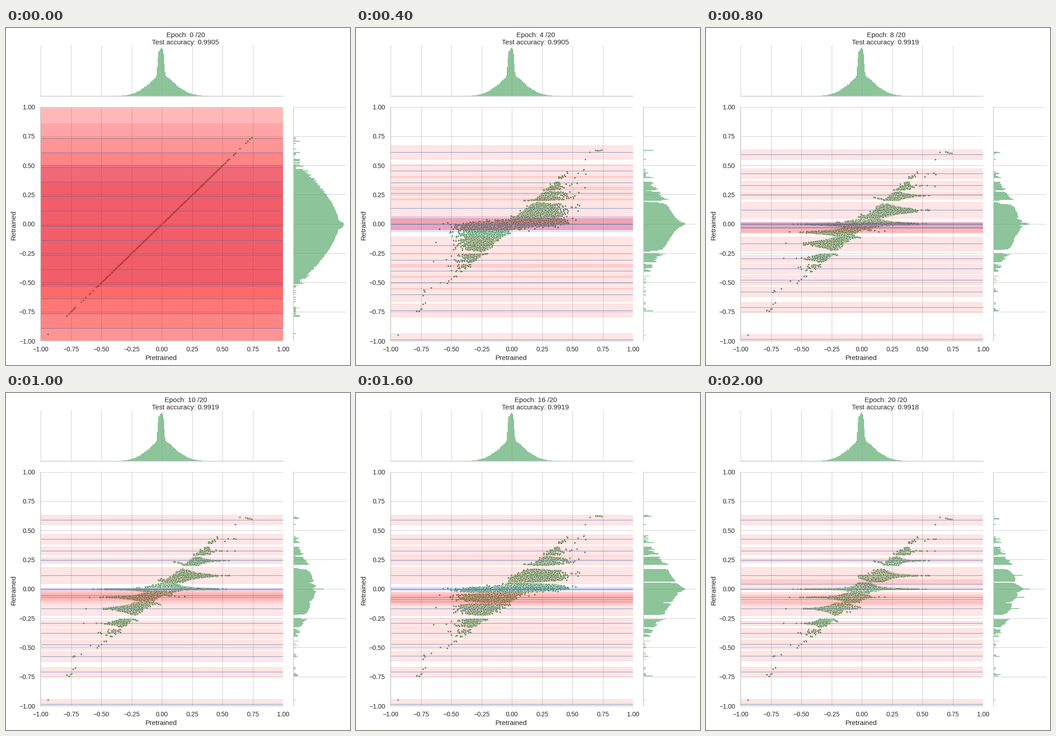
Write a matplotlib script that moves like this. It is 755x741 px and loops after 2100 ms.

```python
import numpy as np
import matplotlib.pyplot as plt
from matplotlib.animation import FuncAnimation

W, H, DPI = 755, 741, 100
EPOCHS = 20
PX = 72 / DPI
GREEN, DOT, BLUE, GREY, INK = "#55a868", "#479658", "#4c72b0", "#cccccc", "#262626"

plt.rcParams.update({
    "font.family": "Liberation Sans", "text.color": INK,
    "xtick.labelcolor": INK, "ytick.labelcolor": INK,
    "axes.edgecolor": GREY, "axes.linewidth": 1.6 * PX, "axes.axisbelow": True,
    "grid.color": GREY, "grid.linewidth": PX,
})

# Cluster centres the weights settle on, above and below zero.
UPPER = np.array([.59, .425, .325, .243, .115])
LOWER = np.array([-.167, -.293, -.377, -.473, -.573, -.708, -.985])
ROWS = np.concatenate([UPPER, [0, -.07], LOWER])
START = .735 - .125 * np.arange(15)     # even spacing before training
CORE = slice(5, 8)                      # three clusters that meet at zero


def tight(epoch):
    """How firmly weights cling to their cluster; relaxes once at epoch 16."""
    return np.interp(epoch, [4, 13, 16, 20], [0, 1, .1, 1])


def zero_pin(epoch):
    return np.interp(epoch, [6, 10, 13, 16], [0, 1, 1, 0])


def late_pin(epoch):
    return np.interp(epoch, [16, 20], [0, 1])


def log_density(v):
    wide = np.maximum(101 - 260 * np.abs(v) ** 1.6, -5)
    return (wide + 9.5 * np.exp(-((v + .009) / .031) ** 6)) / 12.5


# Initial weights.
rng = np.random.default_rng(4)
grid = np.linspace(-.79, .738, 4000)
cdf = np.cumsum(np.exp(log_density(grid)))
x = np.interp(rng.random(110_000), cdf / cdf[-1], grid)
x = np.append(x, [-.94, -.788, .738, .725])

# Each weight shrinks a random way towards zero, less so in the tails.
reach = np.clip((.76 - np.abs(x) - .08 * (x > 0)) / .16, 0, 1)
scale = 1 - reach * (1 - rng.random(x.size) ** 1.6)
z = x * scale + rng.laplace(0, .007, x.size)
drift = rng.normal(0, .04, x.size) * np.exp(-(x / .25) ** 2) * scale

row = ROWS[np.argmin(np.abs((z + drift)[:, None] - ROWS), axis=1)]
inner = np.abs(row) < .2
limit = np.where(inner, .1, .04)
outlying = np.maximum(np.abs(x - row) - .06, 0)
near_zero = (row == 0) & (np.abs(z) < .02)
late = inner & (rng.random(x.size) < .5)
shown = (np.abs(x) > .2) | (np.arange(x.size) % 4 == 0)


def weights(epoch):
    drifted = z + drift * np.interp(epoch, [6, 16], [0, 1])
    offset = limit * np.tanh((drifted - row) / limit)
    pull = np.where(inner, 12, 25) * tight(epoch)
    pin = np.minimum(near_zero * zero_pin(epoch) + late * late_pin(epoch), 1)
    y = row + offset * np.exp(-pull * outlying) * (1 - pin)
    return x + (y - x) * (1 - np.exp(-1.2 * epoch))


def bar_lengths(y, epoch):
    n = np.histogram(y, edges)[0]
    logs = np.log(np.maximum(n, 1))
    peak = 92 + 18 * np.exp(-epoch) - 26 * zero_pin(epoch) - 12 * late_pin(epoch)
    return np.where(n > 0, 5 + (peak - 5) * logs / logs.max(), 0)


def band_layout(epoch):
    """Centres and half-heights of the cluster bands."""
    low = np.interp(epoch, [6, 11], [0, -.07])
    high = np.interp(epoch, [6, 11, 16, 20], [0, -.07, -.07, .04])
    goal = np.concatenate([UPPER, [high, low, 1.3 * low], LOWER])
    move, shrink = np.full(15, .45), np.full(15, .85)
    move[CORE], shrink[CORE] = 2, 1.1
    centres = goal + (START - goal) * np.exp(-move * epoch)

    size = np.abs(goal)
    narrow = .027 * tight(epoch) * np.exp(-((size - .27) / .06) ** 2)
    broad = .035 * np.exp(-((size - .135) / .04) ** 2)
    broad[CORE] = 0
    rest = .042 - narrow + broad * (1 - np.exp(-epoch / 2))
    return centres, rest + (.5 - rest) * np.exp(-shrink * epoch)


fig = plt.figure(figsize=(W / DPI, H / DPI), dpi=DPI, facecolor="white")


def panel(left, top, right, bottom, spines):
    ax = fig.add_axes([left / W, 1 - bottom / H, (right - left) / W, (bottom - top) / H])
    for side, spine in ax.spines.items():
        spine.set_visible(side in spines)
    ax.tick_params(length=0, labelsize=10, pad=8.8)
    return ax


def label(px, py, text, **kw):
    return fig.text(px / W, 1 - py / H, text, size=10.9, ha="center", va="baseline", **kw)


ticks = np.linspace(-1, 1, 9)
edges = np.linspace(-1, 1, 310)

main = panel(76.2, 173.5, 608.2, 688, ("left", "bottom"))
main.set(xlim=(-1, 1), ylim=(-1, 1), xticks=ticks, yticks=ticks)
main.xaxis.set_major_formatter("{x:.2f}")
main.yaxis.set_major_formatter("{x:.2f}")
main.grid(True)

above = panel(76.2, 38, 608.2, 150, ("bottom",))
counts = np.histogram(x, edges)[0]
above.stairs(counts / counts.max() * 106, edges, fill=True, color=GREEN, alpha=.67, lw=0)
above.set(xlim=(-1, 1), ylim=(0, 112), xticks=ticks, yticks=[])
above.grid(True, axis="x")
above.tick_params(labelbottom=False)

side = panel(631, 173.5, 747, 688, ("left",))
bars = side.stairs(np.zeros(edges.size - 1), edges, orientation="horizontal",
                   fill=True, color=GREEN, alpha=.67, lw=0)
side.set(xlim=(0, 116), ylim=(-1, 1), xticks=[], yticks=ticks)
side.grid(True, axis="y")
side.tick_params(labelleft=False)

dots, = main.plot([], [], "o", ms=2.7, mfc=DOT, mec="white", mew=.35, zorder=1)
zero_band = main.axhspan(0, 0, color="blue", alpha=.1, lw=.7, zorder=1)
bands = [main.axhspan(0, 0, color="red", alpha=.1, lw=.7, zorder=1) for _ in START]
lines = [main.axhline(0, color=BLUE, alpha=.75, lw=PX, zorder=2) for _ in START]
zero_line = main.axhline(0, color=BLUE, lw=1.3 * PX, zorder=2)

label(341, 730, "Pretrained")
label(20.5, 433, "Retrained", rotation=90, rotation_mode="anchor")
epoch_text = label(395, 20, "")
score_text = label(393.5, 36, "")


def place(band, centre, half):
    band.set_y(centre - half)
    band.set_height(2 * half)


def draw(epoch):
    y = weights(epoch)
    dots.set_data(x[shown], y[shown])
    bars.set_data(bar_lengths(y, epoch))

    for band, line, c, h in zip(bands, lines, *band_layout(epoch)):
        place(band, c, h)
        line.set_ydata([c, c])
    zero = -.015 * np.exp(-2 * epoch)
    place(zero_band, zero, .5 * np.exp(-.6 * epoch) + .02 * (1 - tight(epoch)))
    zero_line.set_ydata([zero, zero])

    score = .9905 if epoch < 7 else .9919 if epoch < 19 else .9918
    epoch_text.set_text(f"Epoch: {epoch} /{EPOCHS}")
    score_text.set_text(f"Test accuracy: {score:.4f}")
    return [dots, bars, zero_band, *bands, *lines, zero_line, epoch_text, score_text]


anim = FuncAnimation(fig, draw, frames=EPOCHS + 1, interval=100, repeat=True, repeat_delay=0)
plt.show()
```
